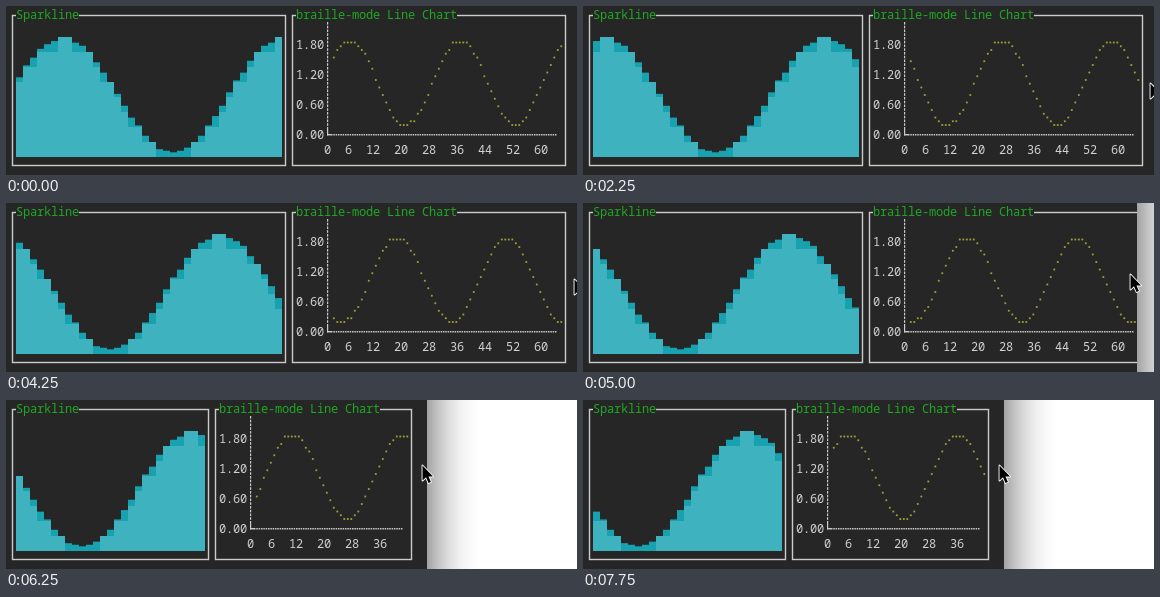
Animation of 571x169 px, one loop 8 s. Source, as an HTML page with a canvas:

```html
<!DOCTYPE html>
<html lang="en">
<head>
<meta charset="utf-8">
<title>Terminal dashboard</title>
<style>
  html, body { margin: 0; width: 100%; height: 100%; overflow: hidden; background: #fff; }
  canvas { display: block; }
</style>
</head>
<body>
<canvas id="stage" width="571" height="169"></canvas>
<script>
const ctx = document.getElementById('stage').getContext('2d');
const W = 571, H = 169, LOOP = 8000;
const CELL_W = 7, CELL_H = 15;
const BACK = '#262626', LINE = '#cbcbcb', TEXT = '#d2d2d2', GREEN = '#1fa823';
const BAR = '#3eb3bf', BAR_TIP = '#18a2b0', DOT = '#a2a032';

// Left and top edge of a character cell
const px = col => 3 + col * CELL_W;
const py = row => 1 + row * CELL_H;

// [start time, x, y]; a null x hides the pointer
const POINTER = [
  [0, null], [2000, 569, 77], [2250, 567, 77], [2750, null], [3750, 568, 76],
  [4750, 562, 74], [5000, 547, 71], [5250, 502, 69], [5500, 432, 67], [5750, 416, 65],
];
// [start time, right edge of the window]
const EDGE = [[0, 600], [5000, 554], [5250, 507], [5500, 437], [5750, 421]];
const at = (keys, t) => keys.filter(k => k[0] <= t).pop();

function rect(x, y, w, h, color) {
  ctx.fillStyle = color;
  ctx.fillRect(x, y, w, h);
}

function print(text, col, row, color) {
  ctx.fillStyle = color;
  [...text].forEach((ch, i) => ctx.fillText(ch, px(col + i) + CELL_W / 2, py(row) + 12));
}

function panel(left, right, title) {
  ctx.strokeStyle = LINE;
  ctx.lineWidth = 1.4;
  ctx.strokeRect(px(left) + 3.5, 9.5, (right - left) * CELL_W, 150);
  rect(px(left + 1), 2, title.length * CELL_W, 14, BACK);
  print(title, left + 1, 0, GREEN);
}

function sparkline(left, right, step) {
  panel(left, right, 'Sparkline');
  for (let col = left + 1; col < right; col++) {
    const value = 1.1 + Math.sin((col - left - 1 + step) / 5);
    const eighths = Math.floor(value / 2.1 * 64 + 0.5);
    const full = Math.floor(eighths / 8);
    const top = 151 - full * CELL_H;
    const tip = eighths % 8 * 1.56;
    rect(px(col), top, CELL_W, full * CELL_H, BAR);
    rect(px(col), top - tip, CELL_W, tip, BAR_TIP);
  }
}

function lineChart(left, right, step) {
  panel(left, right, 'braille-mode Line Chart');
  ['1.80', '1.20', '0.60', '0.00'].forEach((s, i) => print(s, left + 1, 2 + 2 * i, TEXT));

  const axis = left + 5;
  const axisX = px(axis) + 3;
  for (let y = 16; y < 121; y += 3.75) rect(axisX, y, 1.2, 2.6, LINE);
  rect(axisX, 121, 1.2, 8.5, LINE);
  rect(axisX, 128, 4, 1.4, LINE);
  for (let x = px(axis + 1); x < px(right - 1); x += 2.333) rect(x, 128, 1.5, 1.5, LINE);

  print('0', axis, 9, TEXT);
  print('6', axis + 3, 9, TEXT);
  for (let n = 12, col = axis + 6; col + 2 <= right; n += 8, col += 4) print(String(n), col, 9, TEXT);

  const count = (right - axis - 1) * 2;
  for (let i = 0; i < count; i++) {
    const level = Math.floor((1 + Math.sin((i + 2 * step) / 5)) * 11.25 + 0.5);
    rect(px(axis + 1) + 1.9 + i * 3.5, 118.1 - level * 3.75, 1.8, 1.8, DOT);
  }
}

function desktop(edge) {
  rect(edge, 0, W, H, '#fff');
  const shade = ctx.createLinearGradient(edge, 0, edge + 55, 0);
  for (let i = 0; i <= 5; i++) {
    shade.addColorStop(i / 5, `rgba(0,0,0,${0.36 * (1 - i / 5) ** 2})`);
  }
  rect(edge, 0, 55, H, shade);
}

function pointer(x, y) {
  const arrow = new Path2D('M0 0V15L3.5 11.8L6 17.5L8.4 16.4L6 11H10.5Z');
  ctx.save();
  ctx.translate(x + 0.5, y + 0.5);
  ctx.lineJoin = 'round';
  ctx.lineWidth = 1.8;
  ctx.strokeStyle = '#fff';
  ctx.stroke(arrow);
  ctx.fillStyle = '#000';
  ctx.fill(arrow);
  ctx.restore();
}

function draw(t) {
  const step = 33 + Math.floor((t + 250) / 500);
  const half = t < 5750 ? 40 : 29;
  const right = t < 5750 ? 79 : 57;
  const [, edge] = at(EDGE, t);
  const [, x, y] = at(POINTER, t);

  rect(0, 0, W, H, BACK);
  ctx.font = '12px "Noto Sans Mono", "DejaVu Sans Mono", monospace';
  ctx.textAlign = 'center';
  sparkline(0, half - 1, step);
  lineChart(half, right, step);
  if (edge < W) desktop(edge);
  if (x != null) pointer(x, y);
}

const start = performance.now();
function tick() {
  draw((performance.now() - start) % LOOP);
  requestAnimationFrame(tick);
}
tick();
</script>
</body>
</html>
```
